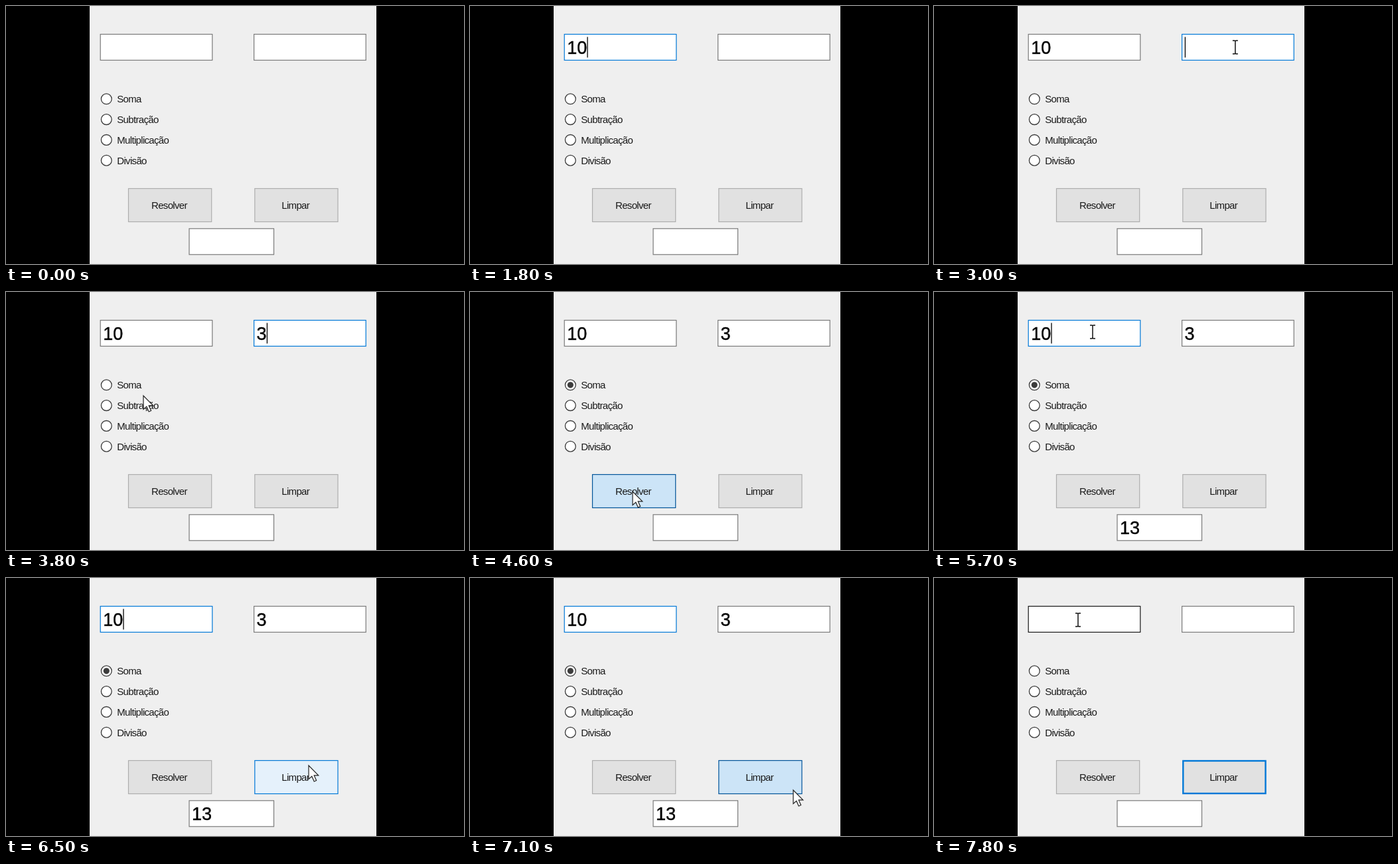
An HTML page for the animation above (8000 ms loop, 690 px wide and 388 px high).

```html
<!DOCTYPE html>
<html lang="pt">
<head>
<meta charset="utf-8">
<title>Calculadora</title>
<style>
html, body { margin: 0; width: 100%; height: 100%; overflow: hidden; background: #000; }
svg { display: block; width: 690px; height: 388px; }
text { font: 15px "Liberation Sans", Arial, sans-serif; letter-spacing: -.68px; fill: #1a1a1a; }
.num { font-size: 27px; letter-spacing: 0; fill: #000; stroke: #000; stroke-width: .4px; }
</style>
</head>
<body>
<svg id="stage" viewBox="0 0 690 388"></svg>
<script>
const LOOP = 8000, STEP = 100, BLINK = 530;
const BLUE = '#0078d7';
const stage = document.getElementById('stage');

const fieldBox = (x, y, w) => ({ x, y, w, h: 39 });
const buttonBox = x => ({ x, y: 274.5, w: 125.2, h: 50 });
const boxes = {
  a: fieldBox(142.2, 42.5, 168.6),
  b: fieldBox(373.6, 42.5, 168.6),
  result: fieldBox(276, 334.8, 127.5),
  solve: buttonBox(184.5),
  clear: buttonBox(374.8),
  soma: { x: 142, y: 131, w: 62, h: 18 }
};
const fields = ['a', 'b', 'result'];

// Pointer stops, [time, x, y]; typing hides the pointer between the paths
const paths = [
  [[800, 297, 271], [1000, 270, 62], [1600, 270, 62]],
  [[2400, 272, 62], [3200, 466, 62], [3300, 466, 62]],
  [[3500, 440, 70], [3800, 207, 156], [4100, 155, 144], [4200, 155, 144], [4600, 245, 300],
   [4900, 245, 300], [5200, 267, 92], [5700, 239, 60], [6000, 239, 60], [6200, 235, 49],
   [6300, 235, 49], [6500, 456, 282], [7100, 487, 319], [7200, 487, 319], [7800, 217, 63],
   [LOOP, 217, 63]]
];

// What the user does, each step changing part of the form
const steps = [
  [0, { a: '', b: '', result: '' }],
  [1100, { focus: 'a' }],
  [1700, { a: '1' }],
  [1800, { a: '10' }],
  [3000, { focus: 'b' }],
  [3300, { b: '3' }],
  [4200, { focus: 'soma', checked: true }],
  [4600, { focus: 'solve', pressed: true }],
  [4800, { result: '13', pressed: false }],
  [5400, { focus: 'a' }],
  [6900, { pressed: true }],
  [7200, { focus: 'clear', pressed: false, checked: false, a: '', b: '', result: '' }]
];

function pointerAt(t) {
  const path = paths.find(p => t >= p[0][0] && t < p[p.length - 1][0]);
  if (!path) return null;
  const i = path.findIndex(p => p[0] > t);
  const [t0, x0, y0] = path[i - 1], [t1, x1, y1] = path[i];
  const k = 1 - (1 - (t - t0) / (t1 - t0)) ** 2;
  return [x0 + (x1 - x0) * k, y0 + (y1 - y0) * k];
}

function stateAt(t) {
  const s = { pointer: pointerAt(t) };
  for (const [time, change] of steps) {
    if (time > t) break;
    Object.assign(s, change);
    if (change.focus || s.focus in change) s.caretStart = time;
  }
  s.caret = Math.floor((t - s.caretStart) / BLINK) % 2 === 0;
  if (s.pointer) {
    const [px, py] = s.pointer;
    s.hover = Object.keys(boxes).find(id => {
      const { x, y, w, h } = boxes[id];
      return px >= x && px <= x + w && py >= y && py <= y + h;
    });
  }
  return s;
}

const rect = ({ x, y, w, h }, fill, stroke, width = 1.2) =>
  `<rect x="${x}" y="${y}" width="${w}" height="${h}" fill="${fill}" stroke="${stroke}" stroke-width="${width}"/>`;

const label = (x, y, s, extra = '') => `<text x="${x}" y="${y}" ${extra}>${s}</text>`;

function field(id, s) {
  const { x, y } = boxes[id], value = s[id], focused = s.focus === id;
  const edge = focused ? BLUE : s.hover === id ? '#171717' : '#7a7a7a';
  let out = rect(boxes[id], '#fff', edge) + label(x + 4, y + 29.4, value, 'class="num"');
  if (focused && s.caret) {
    out += `<path d="M${x + 4.8 + value.length * 15} ${y + 4}v31" stroke="#000" stroke-width="1.3"/>`;
  }
  return out;
}

function button(id, name, s) {
  const box = boxes[id], { x, y, w, h } = box, over = s.hover === id;
  const text = label(x + w / 2 - 1.2, y + 30.6, name, 'text-anchor="middle"');
  if (over && s.pressed) return rect(box, '#cce4f7', '#005499') + text;
  if (over) return rect(box, '#e5f1fb', BLUE) + text;
  if (s.focus === id) {
    return rect({ x: x + .5, y: y + .5, w: w - 1, h: h - 1 }, '#e1e1e1', BLUE, 2.4) + text;
  }
  return rect(box, '#e1e1e1', '#adadad') + text;
}

function radio(name, i, s) {
  const y = 139.8 + i * 30.8, first = i === 0;
  const color = first && s.hover === 'soma' ? BLUE : '#3c3c3c';
  const dot = first && s.checked ? `<circle cx="151.3" cy="${y}" r="4.6" fill="${color}"/>` : '';
  return `<circle cx="151.3" cy="${y}" r="7.9" fill="#fff" stroke="${color}" stroke-width="1.3"/>`
    + dot + label(167.3, y + 5.6, name);
}

function pointer(s) {
  if (!s.pointer) return '';
  const shape = fields.includes(s.hover)
    ? '<path d="M-4-10h3l1 1 1-1h3M0-9V9M-4 10h3l1-1 1 1h3" fill="none" stroke="#111" stroke-width="1.5"/>'
    : '<path d="M0 0V20.5L4.8 16.2 8.2 24 11.6 22.5 8.2 14.9H14.7Z" fill="#fff" stroke="#222" stroke-width="1.2"/>';
  return `<g transform="translate(${s.pointer})">${shape}</g>`;
}

function draw(t) {
  const s = stateAt(t);
  stage.innerHTML = '<path d="M0 0H690V388H0Z"/><path d="M126 0H558V388H126Z" fill="#efefef"/>'
    + fields.map(id => field(id, s)).join('')
    + ['Soma', 'Subtração', 'Multiplicação', 'Divisão'].map((name, i) => radio(name, i, s)).join('')
    + button('solve', 'Resolver', s) + button('clear', 'Limpar', s)
    + pointer(s);
}

let last = -1;
function tick() {
  const t = Math.floor(performance.now() % LOOP / STEP) * STEP;
  if (t !== last) draw(last = t);
  requestAnimationFrame(tick);
}
tick();
</script>
</body>
</html>
```
